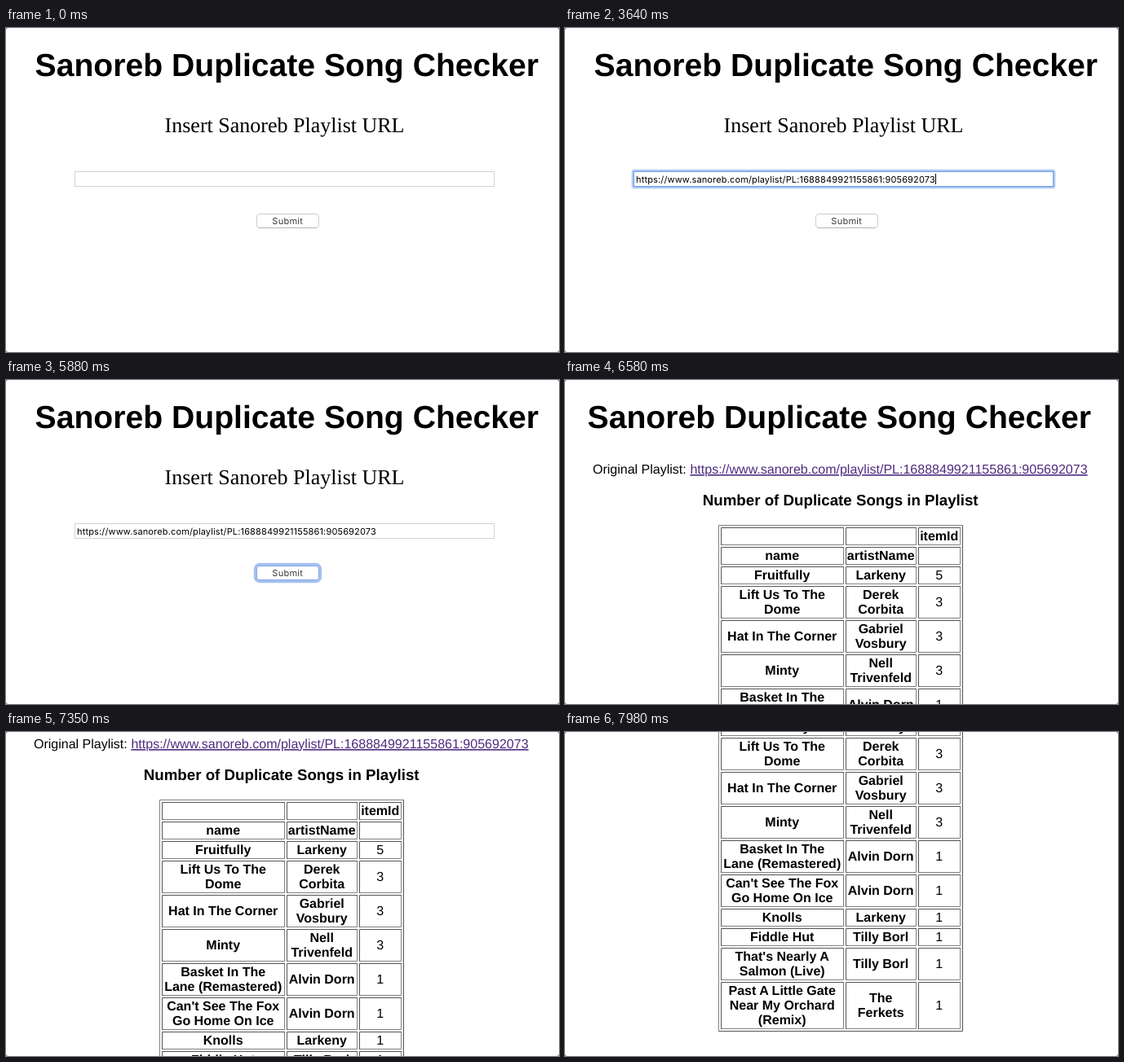
Write an HTML page that moves like this. It is 678 px wide and 398 px high and loops after 8000 ms.

```html
<!DOCTYPE html>
<html lang="en">
<head>
<meta charset="utf-8">
<title>Duplicate Song Checker</title>
<style>
html, body { margin: 0; width: 100%; height: 100%; overflow: hidden; background: #fff; }
svg { display: block; }
text { font-family: "Liberation Sans", Arial, sans-serif; font-size: 16px; text-rendering: geometricPrecision; white-space: pre; }
.h1 { font-size: 39.14px; font-weight: bold; }
.h3 { font-size: 18.72px; font-weight: bold; }
.b { font-weight: bold; }
.mid { text-anchor: middle; }
.lead { font-family: "Liberation Serif", "Times New Roman", serif; font-size: 26px; }
.ui { font-family: Inter, Roboto, sans-serif; font-size: 11px; letter-spacing: .145px; }
.btn { letter-spacing: .25px; }
.link { font-size: 16.04px; fill: #4f2b80; text-decoration: underline; }
.line { fill: none; stroke-width: 1; }
</style>
</head>
<body>
<svg width="678" height="398" viewBox="0 0 678 398" xmlns="http://www.w3.org/2000/svg">
  <rect width="678" height="398" fill="#fff"/>
  <g id="form">
    <text class="h1" x="35.6" y="59">Sanoreb Duplicate Song Checker</text>
    <text class="lead" x="194.6" y="128">Insert Sanoreb Playlist URL</text>
    <rect x="84.5" y="176.5" width="514" height="18" fill="#fff" stroke="#d2d2d2"/>
    <g id="fieldRing" fill="none">
      <rect x="83" y="175" width="517" height="21" rx="2" stroke="#bdd3f5" stroke-width="3"/>
      <rect x="84.25" y="176.25" width="514.5" height="18.5" rx=".5" stroke="#78a4e6" stroke-width="1.5"/>
    </g>
    <text id="url" class="ui" x="87" y="190"></text>
    <rect id="caret" x="87" y="179" width="1" height="13"/>
    <rect id="btnRing" x="305.5" y="226.5" width="80" height="21" rx="5.5" fill="none" stroke="#a3c0ee" stroke-width="3.4"/>
    <rect id="btn" x="307.5" y="228.5" width="76" height="17" rx="3.5" fill="#fff" stroke="#cdcdcd"/>
    <path id="btnEdge" d="M310 245.5H381" stroke="#b4b4b4"/>
    <text class="ui btn mid" x="345.2" y="241" fill="#3c3c3c">Submit</text>
  </g>
  <g id="report">
    <text class="h1" x="27.6" y="59">Sanoreb Duplicate Song Checker</text>
    <text x="34" y="115">Original Playlist: </text>
    <text id="link" class="link" x="153.4" y="115"></text>
    <text class="h3 mid" x="337.7" y="154">Number of Duplicate Songs in Playlist</text>
    <g id="table"></g>
  </g>
  <path d="M0 0h2L0 2zM678 0v2l-2-2zM0 398v-2l2 2zM678 398h-2l2-2z" fill="#8a8a8a"/>
</svg>
<script>
const LOOP = 8000, STEP = 70;
const URL_TEXT = 'https://www.sanoreb.com/playlist/PL:1688849921155861:905692073';
const FOCUS = 1470, PASTE = 3640, TAB = 4410, RESULT = 6020;
const LIGHT = '#808080', DARK = '#555';

// Columns: left edge and width
const COLS = [[191, 151], [344, 87], [433, 52]];
// A bar marks a line break inside a cell
const ROWS = [
  ['', '', 'itemId'],
  ['name', 'artistName', ''],
  ['Fruitfully', 'Larkeny', '5'],
  ['Lift Us To The|Dome', 'Derek|Corbita', '3'],
  ['Hat In The Corner', 'Gabriel|Vosbury', '3'],
  ['Minty', 'Nell|Trivenfeld', '3'],
  ['Basket In The|Lane (Remastered)', 'Alvin Dorn', '1'],
  ["Can't See The Fox|Go Home On Ice", 'Alvin Dorn', '1'],
  ['Knolls', 'Larkeny', '1'],
  ['Fiddle Hut', 'Tilly Borl', '1'],
  ["That's Nearly A|Salmon (Live)", 'Tilly Borl', '1'],
  ['Past A Little Gate|Near My Orchard|(Remix)', 'The|Ferkets', '1']
];
// Scroll position over time: [ms, px]
const SCROLL = [[6930, 0], [7000, 2], [7070, 8], [7140, 20], [7210, 43], [7280, 70], [7350, 95],
  [7420, 115], [7490, 126], [7770, 126], [7840, 152], [7910, 202], [7980, 246]];

const $ = id => document.getElementById(id);

function add(parent, tag, attrs, text) {
  const el = document.createElementNS('http://www.w3.org/2000/svg', tag);
  for (const k in attrs) el.setAttribute(k, attrs[k]);
  if (text) el.textContent = text;
  parent.appendChild(el);
}

// One-pixel bevelled frame
function bevel(x, y, w, h, topLeft, bottomRight) {
  const l = x + .5, t = y + .5, r = x + w - .5, b = y + h - .5;
  add($('table'), 'path', { class: 'line', stroke: bottomRight, d: `M${l} ${b}H${r}V${t}` });
  add($('table'), 'path', { class: 'line', stroke: topLeft, d: `M${l} ${b + .5}V${t}H${r + .5}` });
}

function buildTable() {
  let y = 181;
  ROWS.forEach((row, i) => {
    const cells = row.map(c => c.split('|'));
    const h = 4 + 18 * Math.max(...cells.map(c => c.length));
    cells.forEach((lines, j) => {
      const [x, w] = COLS[j];
      bevel(x, y, w, h, DARK, LIGHT);
      const top = y + (h - 18 * lines.length) / 2 + 14;
      lines.forEach((s, n) => add($('table'), 'text', {
        class: j < 2 || i === 0 ? 'mid b' : 'mid', x: x + w / 2 - .3, y: top + 18 * n
      }, s));
    });
    y += h + 2;
  });
  bevel(188, 178, 300, y + 1 - 178, LIGHT, DARK);
}

function scrollAt(t) {
  if (t <= SCROLL[0][0]) return 0;
  for (let i = 1; i < SCROLL.length; i++) {
    const [t0, a] = SCROLL[i - 1], [t1, b] = SCROLL[i];
    if (t <= t1) return Math.round(a + (b - a) * (t - t0) / (t1 - t0));
  }
  return SCROLL[SCROLL.length - 1][1];
}

function show(id, on) { $(id).style.display = on ? '' : 'none'; }

function caretOn(t) {
  if (t >= PASTE) return t < PASTE + 560;
  return (t - FOCUS) % 1050 < 560;
}

function draw(time) {
  const t = Math.floor(time % LOOP / STEP) * STEP;
  const typing = t >= FOCUS && t < TAB, pasted = t >= PASTE;
  show('form', t < RESULT);
  show('report', t >= RESULT);
  show('fieldRing', typing);
  show('caret', typing && caretOn(t));
  show('url', pasted);
  show('btnRing', t >= TAB);
  show('btnEdge', t < TAB);
  $('btn').setAttribute('stroke', t >= TAB ? '#86abe4' : '#cdcdcd');
  $('caret').setAttribute('x', pasted ? 454 : 87);
  $('report').setAttribute('transform', `translate(0 ${-scrollAt(t)})`);
}

function tick() {
  draw(performance.now());
  requestAnimationFrame(tick);
}

$('url').textContent = $('link').textContent = URL_TEXT;
buildTable();
tick();
</script>
</body>
</html>
```
